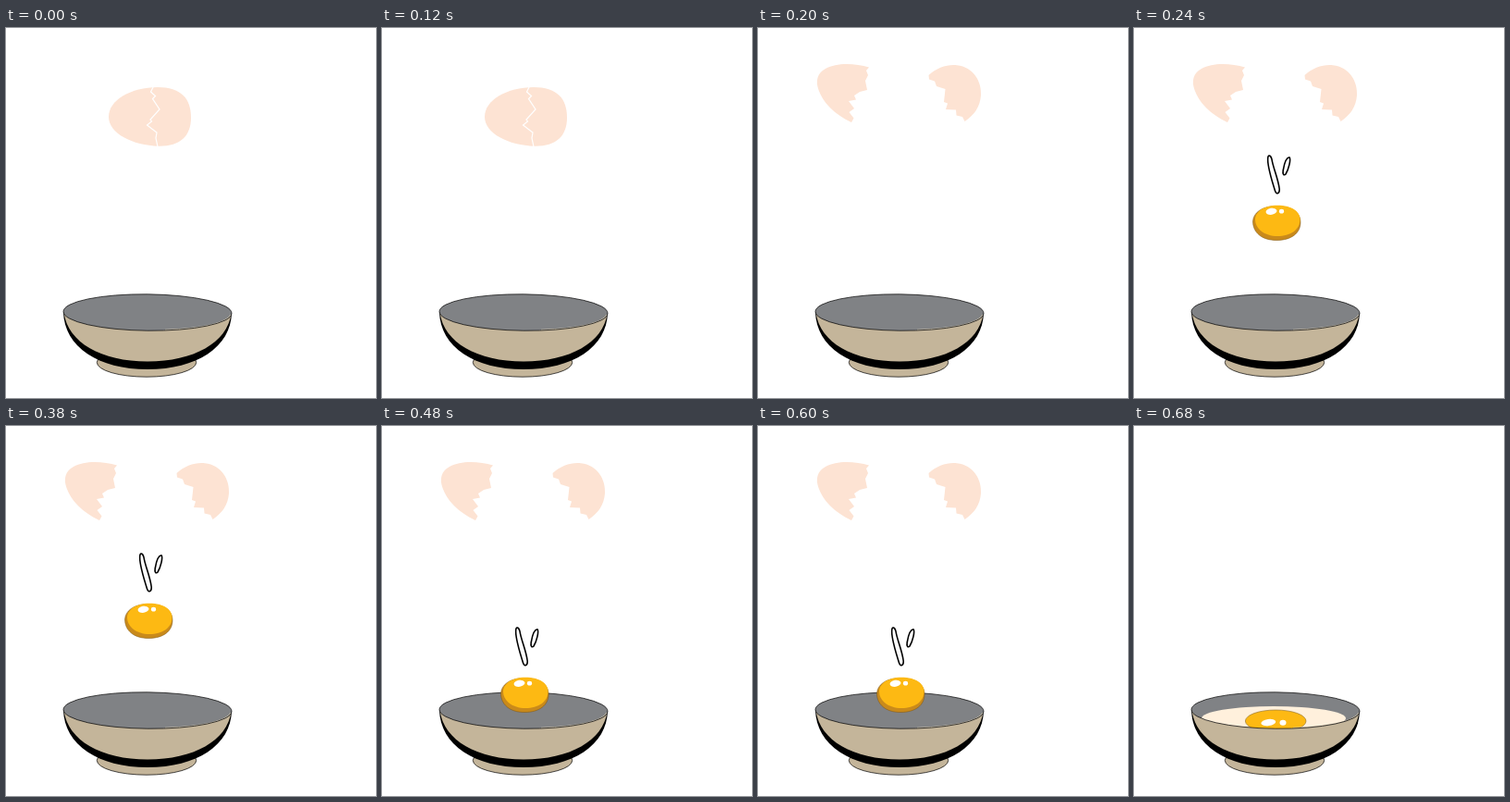
Recreate the animation shown at these times as an HTML page. Size 400 by 400 pixels, loop 800 ms.

```html
<!DOCTYPE html>
<html lang="en">
<head>
<meta charset="utf-8">
<title>Egg into a bowl</title>
<style>
  html, body { margin: 0; width: 100%; height: 100%; overflow: hidden; background: #fff; }
  svg { display: block; width: 100vw; height: 100vh; }

  .step { animation: 800ms step-end infinite; }
  #egg { animation-name: egg; }
  #shells { animation-name: shells; }
  #drop { animation-name: drop; }
  #served { animation-name: served; }

  @keyframes egg { 0% { visibility: visible } 25%, 100% { visibility: hidden } }
  @keyframes shells { 0% { visibility: hidden } 25% { visibility: visible } 85%, 100% { visibility: hidden } }
  @keyframes drop {
    0% { visibility: hidden; transform: none }
    30% { visibility: visible; transform: none }
    60% { visibility: visible; transform: translateY(80px) }
    85%, 100% { visibility: hidden; transform: none }
  }
  @keyframes served { 0% { visibility: hidden } 85%, 100% { visibility: visible } }

  .shell { fill: #fde3d3; }
  .clay { fill: #c4b59a; }
  .yolk { fill: #fdb913; }
  .white { fill: #fff; }
  .line { stroke: #000; stroke-width: .7; }
  .streak { fill: #fff; stroke: #000; stroke-width: 1.6; stroke-linejoin: round; }
</style>
</head>
<body>
<svg viewBox="0 0 400 400">
  <defs>
    <ellipse id="rim" cx="153" cy="307.5" rx="91" ry="19.7" transform="rotate(.6 153 307.5)"/>
    <clipPath id="inside"><use href="#rim"/></clipPath>
  </defs>

  <g id="bowl">
    <ellipse class="clay line" cx="152" cy="361.5" rx="53.7" ry="15.7"/>
    <path d="M62 307C63 345 100 369 153 369S243 345 244 308Z"/>
    <path class="clay" d="M62.6 308C67 340 103 360.5 153 360.5S239 340 243.5 309Z"/>
    <use href="#rim" fill="#808285"/>
  </g>

  <g id="served" class="step">
    <g clip-path="url(#inside)">
      <ellipse cx="151" cy="316" rx="78" ry="13" fill="#fff0dc"/>
      <ellipse class="yolk" cx="153.2" cy="319" rx="32.8" ry="12" stroke="#8a6a2a" stroke-width=".6"/>
      <ellipse class="white" cx="145.3" cy="320.5" rx="8" ry="3.6" transform="rotate(-8 145.3 320.5)"/>
      <ellipse class="white" cx="161" cy="320.7" rx="3.5" ry="3"/>
    </g>
  </g>

  <path d="M172 326.3C212 325 238 319 243 310" fill="none" stroke="#d3c7b0" stroke-width="1"/>
  <use href="#rim" class="line" fill="none"/>

  <g id="egg" class="step">
    <path class="shell" d="M111 96C111 78 135 64 164 64C189 64 200 76 200 97C200 117 188 128 165 127.7C137 127 111 114 111 96Z"/>
    <path d="M159.500 63L156.500 69L161.500 73.500L158.500 76.500L166 88L156 99L157.500 101L152.500 105L163 113L162 119L164 128.500" fill="none" stroke="#fff" stroke-width="1.2"/>
  </g>

  <g id="shells" class="step shell">
    <path d="M120 42.500C105 38 85 37 73 44C64 49 62 57 65.500 67C70 80 82 93 101 102L103.500 97.500L98.500 91L104 87L98 79L106 77.500L104 73L110 69L118 67L116 57L119 51L117 46Z"/>
    <path d="M184.500 51C193 43 205 39 215 40.200C233 42 242 58 241 73C240 85 234 94 223.500 101L221 96L214.500 94.500L214 88.500L203 88L205 81.500L201 80L202.500 66L193 63L191 57.500L185 55.500Z"/>
  </g>

  <g id="drop" class="step">
    <path class="streak" d="M145 139C146 137 148 138 149 142C150 150 156 163 157.200 174C157.500 179 154 180.500 152.500 176C149 165 143 146 145 139Z"/>
    <path class="streak" d="M168 139.800C170 142 167 153 164 158C162 160 160.500 158 161.200 154C162.500 146 165 140 168 139.800Z"/>
    <path d="M128.500 209C129 200 138 192.500 154 192.500S180 199 180 210C180 222 170 229.500 154 229.500S128.500 221 128.500 209Z" fill="#c98a1b" stroke="#7a5514" stroke-width=".5"/>
    <path class="yolk" d="M131 207C131 199 140 191.800 155 191.800S179.500 198 179.500 207C179.500 218 169 225 155 225S131 217 131 207Z"/>
    <ellipse class="white" cx="148.500" cy="198.300" rx="6" ry="3.500" transform="rotate(-10 148.500 198.300)"/>
    <ellipse class="white" cx="159.500" cy="198.200" rx="2.600" ry="2.400"/>
  </g>
</svg>
</body>
</html>
```
